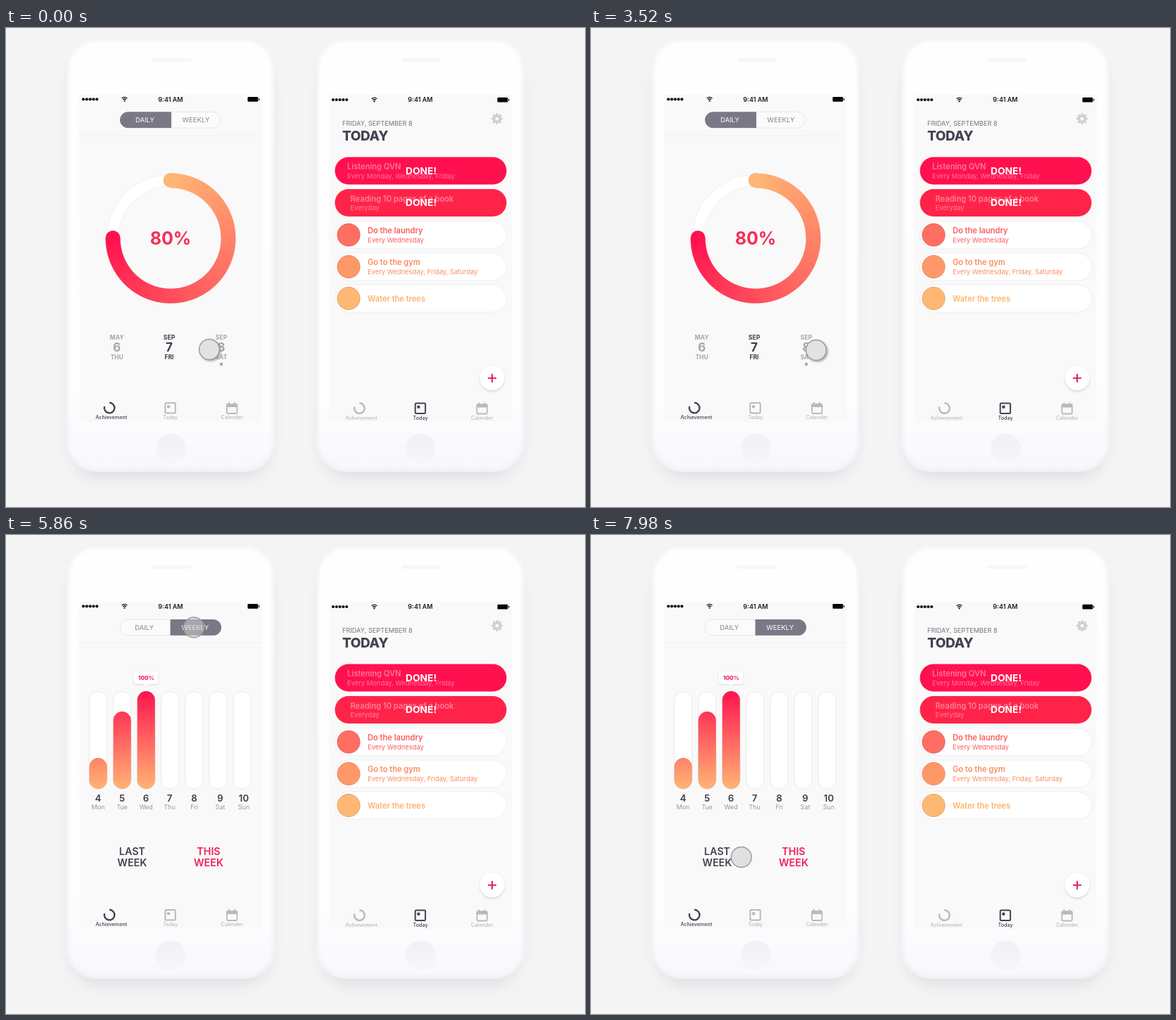
Recreate the animation shown at these times as an HTML page. Size 823 px wide and 681 px high, loop 8000 ms.

```html
<!DOCTYPE html>
<html lang="en">
<head>
<meta charset="utf-8">
<title>Habit tracker</title>
<style>
  html, body { margin: 0; width: 100%; height: 100%; overflow: hidden; background: #f4f4f4; }
  #stage { position: absolute; left: 0; top: 0; width: 823px; height: 681px; overflow: hidden; }
  svg { position: absolute; left: 0; top: 0; font-family: Inter, sans-serif; }
  #arc {
    position: absolute; left: 134px; top: 198.5px; width: 200px; height: 200px;
    -webkit-mask: radial-gradient(circle, transparent 71px, #000 72px, #000 92px, transparent 93px);
    mask: radial-gradient(circle, transparent 71px, #000 72px, #000 92px, transparent 93px);
  }
</style>
</head>
<body>
<div id="stage">
  <svg id="back" width="823" height="681"></svg>
  <div id="arc"></div>
  <svg id="front" width="823" height="681"></svg>
</div>
<script>
const $ = id => document.getElementById(id);
const RED = '#ff134f', ORANGE = '#ffb574', DARK = '#454251', GREY = '#a6a6a8';

const text = (x, y, str, size, weight, fill, anchor = 'middle', extra = '') =>
  `<text x="${x}" y="${y}" font-size="${size}" font-weight="${weight}" fill="${fill}" text-anchor="${anchor}" ${extra}>${str}</text>`;
const rect = (x, y, w, h, r, fill, extra = '') =>
  `<rect x="${x}" y="${y}" width="${w}" height="${h}" rx="${r}" fill="${fill}" ${extra}/>`;
const dot = (x, y, r, fill, extra = '') =>
  `<circle cx="${x}" cy="${y}" r="${r}" fill="${fill}" ${extra}/>`;
const path = (d, stroke, width, extra = '') =>
  `<path d="${d}" fill="none" stroke="${stroke}" stroke-width="${width}" ${extra}/>`;
const group = (attrs, body) => `<g ${attrs}>${body}</g>`;

const defs = `<defs>
  <linearGradient id="body" x1="0" y1="0" x2="0" y2="1">
    <stop offset="0" stop-color="#fefefe"/><stop offset=".85" stop-color="#fdfdfe"/><stop offset="1" stop-color="#f7f8fc"/>
  </linearGradient>
  <linearGradient id="home" x1="0" y1="0" x2="0" y2="1">
    <stop offset="0" stop-color="#f0f1f4"/><stop offset="1" stop-color="#f7f7fa"/>
  </linearGradient>
  <linearGradient id="bar" gradientUnits="userSpaceOnUse" x1="0" y1="222" x2="0" y2="361">
    <stop offset="0" stop-color="${RED}"/><stop offset="1" stop-color="${ORANGE}"/>
  </linearGradient>
  <filter id="soft" x="-30%" y="-30%" width="160%" height="160%"><feGaussianBlur stdDeviation="10"/></filter>
  <filter id="edge"><feGaussianBlur stdDeviation="3"/></filter>
  <filter id="small" x="-50%" y="-50%" width="200%" height="200%"><feGaussianBlur stdDeviation="1.6"/></filter>
  <clipPath id="bodyClip"><rect x="86" y="16" width="296" height="615" rx="42"/></clipPath>
  <clipPath id="dates"><rect x="110" y="430" width="245" height="56"/></clipPath>
</defs>`;

function phone() {
  return rect(92, 40, 284, 600, 42, '#d5d5da', 'opacity=".65" filter="url(#soft)"') +
    rect(86, 16, 296, 615, 42, 'url(#body)') +
    group('clip-path="url(#bodyClip)"',
      rect(85, 14, 298, 617, 43, 'none', 'stroke="#eceef5" stroke-width="6" filter="url(#edge)"')) +
    rect(207.5, 43, 56, 5, 2.5, '#f6f6f7') +
    dot(234.5, 598, 21.5, 'url(#home)') +
    rect(104, 95, 260, 465, 0, '#f9f9f9');
}

function status() {
  let s = '';
  for (let i = 0; i < 5; i++) s += dot(110 + i * 4.8, 101.3, 2.1, '#111');
  s += path('M164.6 100a5.6 5.6 0 0 1 7.8 0M166.2 101.9a3.3 3.3 0 0 1 4.6 0', '#111', 1.3) + dot(168.5, 103.7, 1.1, '#111');
  s += text(234, 104.8, '9:41 AM', 9, 600, '#1c1c1e');
  return s + rect(343.5, 98, 14.8, 6.8, 1.2, '#050505') + rect(359, 100, 1.3, 2.8, .6, '#050505');
}

function tabs(active) {
  const color = i => i === active ? DARK : '#b9b9bb';
  const label = (x, str, i) => text(x, 556, str, 7.2, 500, color(i));
  return path('M147 532.8a7.3 7.3 0 1 1 -7 5.2', color(0), 2.4) + label(149.7, 'Achievement', 0) +
    rect(226.3, 533, 14.4, 14.6, 1.5, 'none', `stroke="${color(1)}" stroke-width="2"`) +
    rect(229, 536.2, 4, 4, .8, color(1)) + label(233.7, 'Today', 1) +
    rect(314, 535, 14.4, 13, 1.5, 'none', `stroke="${color(2)}" stroke-width="1.8"`) +
    rect(313.4, 534, 15.6, 5, 1, color(2)) +
    rect(316, 532, 2, 3, 0, color(2)) + rect(324, 532, 2, 3, 0, color(2)) + label(321.2, 'Calender', 2);
}

function gear(x, y) {
  let s = '';
  for (let a = 0; a < 360; a += 45)
    s += rect(x - 1.7, y - 7.8, 3.4, 5, .8, '#cfcfd1', `transform="rotate(${a} ${x} ${y})"`);
  return s + dot(x, y, 4.1, 'none', 'stroke="#cfcfd1" stroke-width="3"');
}

function done(y, fill, x, title, sub) {
  return rect(467.5, y, 244, 39, 19.5, fill) +
    text(x, y + 17.8, title, 11.1, 600, '#fff', 'start', 'opacity=".42"') +
    text(x, y + 30.2, sub, 9.4, 400, '#fff', 'start', 'opacity=".42"') +
    text(590, y + 24.2, 'DONE!', 13.8, 700, '#fff');
}

function task(y, fill, ink, title, sub) {
  return rect(467.5, y, 244, 39, 19.5, '#fff', 'stroke="#efeff0"') +
    dot(487, y + 19.5, 16.4, fill, 'stroke="#000" stroke-opacity=".17" stroke-width=".8"') +
    text(514, y + (sub ? 17.4 : 23.8), title, 11.1, 600, ink, 'start') +
    (sub ? text(514, y + 29.8, sub, 9.4, 400, ink, 'start') : '');
}

function todayScreen() {
  return text(478, 138.5, 'FRIDAY, SEPTEMBER 8', 9.2, 400, '#77757e', 'start') +
    text(478, 159.7, 'TODAY', 19, 800, DARK, 'start', 'letter-spacing="-.4"') + gear(698, 129) +
    done(183.5, '#ff114f', 485, 'Listening QVN', 'Every Monday, Wednesday, Friday') +
    done(229, '#ff2349', 489.5, 'Reading 10 pages of a book', 'Everyday') +
    task(274.7, '#ff6e62', '#fa5d60', 'Do the laundry', 'Every Wednesday') +
    task(320, '#ff9868', '#fb8d60', 'Go to the gym', 'Every Wednesday, Friday, Saturday') +
    task(365, '#ffb873', '#fdb36b', 'Water the trees') +
    dot(691, 499.5, 17.5, '#bbb', 'opacity=".55" filter="url(#small)"') + dot(691, 497.8, 17.5, '#fff') +
    path('M685 497.8h12M691 491.8v12', '#e3224f', 2);
}

function toggle(y, weekly) {
  const w = weekly ? 144 : 142.5, mid = weekly ? 233.5 : 235, r = 11.4;
  const fill = weekly
    ? `M${mid} ${y}H${306 - r}a${r} ${r} 0 0 1 0 ${2 * r}H${mid}z`
    : `M${mid} ${y}H${162 + r}a${r} ${r} 0 0 0 0 ${2 * r}H${mid}z`;
  return rect(162, y, w, 2 * r, r, '#fbfbfb', 'stroke="#e8e8e9"') + `<path d="${fill}" fill="#7b7886"/>` +
    text(weekly ? 196.7 : 197.5, y + 14.9, 'DAILY', 9.4, 400, weekly ? '#85838b' : '#fff') +
    text(weekly ? 268.7 : 270, y + 14.9, 'WEEKLY', 9.6, 400, weekly ? '#fff' : '#85838b');
}

function weekScreen() {
  const tops = [317, 251, 222];
  const nums = [131, 165, 199, 232.5, 267.5, 304.5, 338];
  let s = toggle(120, true);
  ['Mon', 'Tue', 'Wed', 'Thu', 'Fri', 'Sat', 'Sun'].forEach((day, i) => {
    const x = 118.5 + i * 34.1;
    s += rect(x, 222.5, 25, 138.5, 12.5, '#fff', 'stroke="#ebebec"');
    if (i < 3) s += rect(x, tops[i], 25, 361 - tops[i], 12.5, 'url(#bar)', 'stroke="#a33" stroke-opacity=".2" stroke-width=".6"');
    s += text(nums[i], 379, 4 + i, 13.2, 600, '#3d3b45') + text(nums[i], 389.5, day, 9, 400, '#98979c');
  });
  s += rect(182, 196, 34, 17, 2, '#bbb', 'opacity=".5" filter="url(#small)"') + rect(182, 194.7, 34, 17, 2, '#fff') +
    '<path d="M196 211.5h6l-3 4z" fill="#fff"/>' + text(199.3, 206.4, '100%', 8, 800, '#f5205a');
  const pair = (x, word, fill) => text(x, 455, word, 14.3, 600, fill) + text(x, 470.6, 'WEEK', 14.3, 600, fill);
  return s + pair(179.3, 'LAST', DARK) + pair(288, 'THIS', '#f4205a');
}

function dates(first, midColor, dotAt) {
  const months = ['MAY', 'SEP', 'SEP'], days = ['THU', 'FRI', 'SAT'];
  return [157.5, 232, 306].map((x, i) => {
    const c = i === 1 ? midColor : GREY;
    return text(x, 442.6, months[i], 8.6, 700, c) + text(x, 459.5, first + i, 17, 700, c) +
      text(x, 471.2, days[i], 8.5, 700, c) + (i === dotAt ? dot(x, 478, 2.2, c) : '');
  }).join('');
}

const trackLine = r => dot(234, 298.5, r, 'none', 'stroke="#eeeeef" stroke-width=".8"');
$('back').innerHTML = defs + phone() + group('transform="translate(355 0)"', phone()) +
  status() + group('transform="translate(355 .7)"', status()) +
  path('M104 153.3H364', '#eeeeef', 1) +
  tabs(0) + group('transform="translate(355.4 .5)"', tabs(1)) + todayScreen() +
  group('id="day"', toggle(119.3, false) +
    dot(234, 298.5, 82, 'none', 'stroke="#fff" stroke-width="16"') + trackLine(90) + trackLine(74) +
    group('clip-path="url(#dates)"',
      group('id="setA"', dates(6, '#3f3d4b', 2)) + group('id="setB"', dates(7, '#ef1e55', 1)))) +
  group('id="week"', weekScreen());

$('front').innerHTML =
  group('id="ring"', dot(234, 216.5, 10.5, ORANGE) + dot(0, 0, 10.5, RED, 'id="cap"') +
    text(234, 307.6, '', 25, 700, RED, 'middle', 'id="pct"')) +
  group('id="cursor"', dot(1.8, 1.8, 15, '#777', 'id="shade" opacity=".6" filter="url(#small)"') +
    dot(0, 0, 14.4, '#e2e2e2', 'id="knob" stroke="#9c9c9c" stroke-width="1.5"'));

const clamp = u => Math.max(0, Math.min(1, u));
const span = (t, a, b) => clamp((t - a) / (b - a));
const mix = (a, b, u) => a + (b - a) * u;
const ease = (u, p = 2.25) => u < .5 ? .5 * (2 * u) ** p : 1 - .5 * (2 - 2 * u) ** p;
const bezier = (a, b, c, d, s) => {
  const r = 1 - s;
  return r * r * r * a + 3 * r * r * s * b + 3 * r * s * s * c + s * s * s * d;
};

// Each move: start, end, easing, then four control points
const line = (x0, y0, x1, y1) =>
  [0, 1 / 3, 2 / 3, 1].map(u => [mix(x0, x1, u), mix(y0, y1, u)]);
const moves = [
  [800, 920, ease, line(289, 457, 302, 458)],
  [1260, 1880, ease, line(302, 458, 157, 455)],
  [2440, 2620, u => u, line(156.4, 455, 152.5, 455)],
  [3000, 3520, ease, line(152.5, 455, 320, 458)],
  [4060, 5060, ease, [[320, 458], [379.3, 240], [361.7, 131], [267, 131.3]]],
  [6360, 7760, u => 1 - (1 - u ** 1.2) ** 4, [[267, 131.3], [330, 350], [330, 470], [171.5, 458.5]]],
  [7920, 7980, u => u, line(171.5, 458.5, 213.7, 458)]
];
const presses = [[1120, 2530], [2800, 3520], [5580, 6360], [7920, 8000]];

function cursorAt(t) {
  let m = moves[0];
  for (const next of moves) if (t >= next[0]) m = next;
  const s = m[2](span(t, m[0], m[1])), p = m[3];
  return [0, 1].map(k => bezier(p[0][k], p[1][k], p[2][k], p[3][k], s));
}

function draw(t) {
  const daily = t < 5860;
  $('day').style.display = $('ring').style.display = $('arc').style.display = daily ? '' : 'none';
  $('week').style.display = daily ? 'none' : '';

  if (daily) {
    const k = ease(span(t, 1260, 1880)) - ease(span(t, 3000, 3520));
    const sweep = mix(270, 141, k), a = sweep * Math.PI / 180;
    $('arc').style.background =
      `conic-gradient(${ORANGE} 0deg, #ff6a62 ${sweep * .5}deg, ${RED} ${sweep}deg, transparent ${sweep}deg)`;
    $('cap').setAttribute('cx', 234 + 82 * Math.sin(a));
    $('cap').setAttribute('cy', 298.5 - 82 * Math.cos(a));
    $('pct').textContent = Math.round(mix(80, 40, k)) + '%';
    $('pct').setAttribute('fill', `rgb(${mix(245, 252, k)},${mix(46, 106, k)},${mix(86, 100, k)})`);
    $('setA').setAttribute('transform', `translate(${-74 * k} 0)`);
    $('setB').setAttribute('transform', `translate(${74 * (1 - k)} 0)`);
    $('setA').setAttribute('opacity', 1 - k);
    $('setB').setAttribute('opacity', k);
  }

  const pressed = presses.some(([from, to]) => t >= from && t < to);
  const [x, y] = cursorAt(t);
  $('cursor').setAttribute('transform', `translate(${x} ${y})`);
  $('shade').style.display = pressed ? 'none' : '';
  $('knob').setAttribute('fill', pressed ? 'rgba(204,204,204,.55)' : '#e2e2e2');
}

const start = performance.now();
function tick() {
  draw((performance.now() - start) % 8000);
  requestAnimationFrame(tick);
}
draw(0);
requestAnimationFrame(tick);
</script>
</body>
</html>
```
